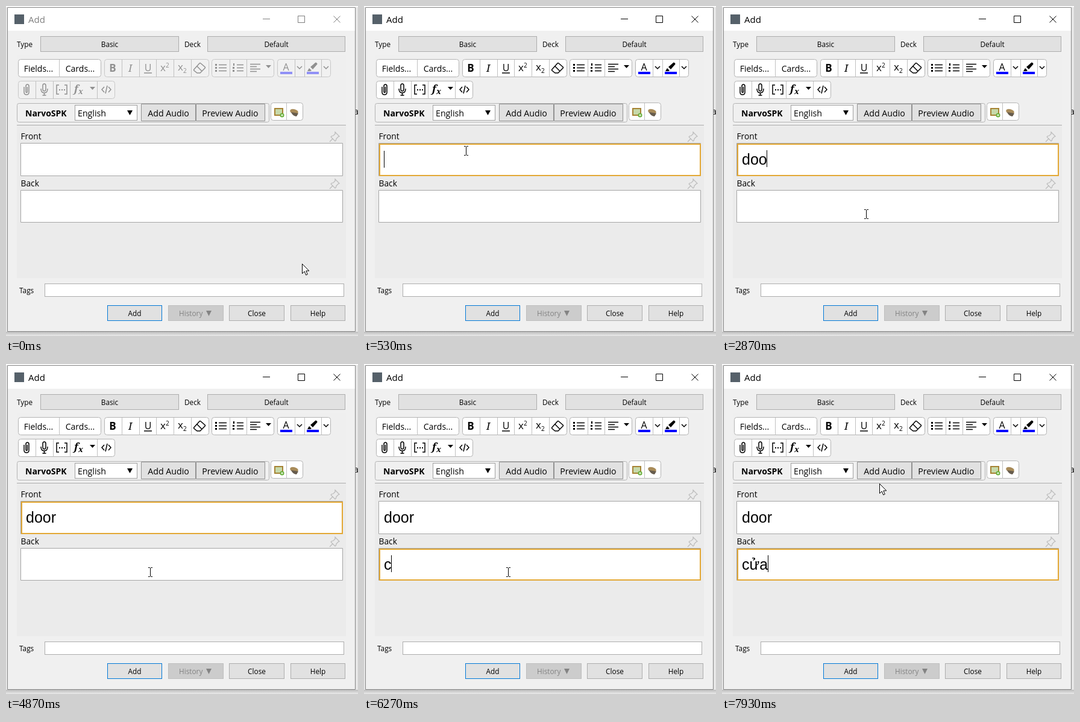
Write an HTML page that moves like this. It is 584 by 547 pixels and loops after 8 s.

```html
<!DOCTYPE html>
<html lang="en">
<head>
<meta charset="utf-8">
<title>Add card</title>
<style>
html, body { margin: 0; width: 100%; height: 100%; overflow: hidden; background: #e6e6e6; }
svg { display: block; width: 584px; height: 547px; }
text { font: 14.2px "Open Sans", "Noto Sans", sans-serif; fill: #000; white-space: pre; }
.mid { text-anchor: middle; }
.small { font-size: 11.8px; }
.label { font-size: 13.8px; }
.bold { font-weight: 700; }
.typed { font: 25px "Liberation Sans", Arial, sans-serif; }
.button { fill: #e1e1e1; stroke: #adadad; }
.box { fill: #fff; stroke: #b4b4b4; }
.sep { fill: none; stroke: #c0c0c0; }
.line { fill: none; stroke: #000; stroke-width: 1.5; }
.pin { fill: none; stroke: #bbb; stroke-width: 1.2; }
.focus { fill: none; stroke: #e3a835; stroke-width: 2; }
.idle .tool { opacity: .4; }
.idle .tool-box { fill: #f1f1f1; stroke: #c8c8c8; }
.idle .title { opacity: .5; }
</style>
</head>
<body>
<svg id="stage" viewBox="0 0 584 547">
  <defs>
    <linearGradient id="shadow" x2="0" y2="1"><stop stop-color="#bdbdbd"/><stop offset="1" stop-color="#e9e9e9"/></linearGradient>
    <path id="down" d="M0 0h9l-4.5 5z"/>
    <path id="chevron" class="line" d="M0 0l4 4 4-4"/>
    <g id="pin" class="pin"><path d="M9 1l7 7-2 1-3 3q0 3-2 4l-7-7q1-2 4-2l3-3zM5 12l-5 5"/></g>
  </defs>

  <!-- window -->
  <path fill="#fafafa" d="M0 0h584v2H0z"/>
  <path fill="url(#shadow)" d="M0 540h584v7H0z"/>
  <text x="577" y="180">a</text>
  <path fill="#f0f0f0" stroke="#858585" d="M2.5 2.5h577v537H2.5z"/>
  <path fill="#fff" d="M3 3h576v38H3z"/>
  <rect x="14" y="14" width="16" height="16" fill="#56616a"/>
  <g class="title">
    <text x="37" y="28" style="font-size:15px">Add</text>
    <path fill="none" stroke="#000" d="M426 21.5h12M484.500 16.500h11v11h-11zM543.500 16.500l11 11m0-11l-11 11"/>
  </g>

  <text class="small" x="18" y="68">Type</text>
  <rect class="button" x="57.500" y="50.500" width="229" height="25"/>
  <text class="small mid" x="172" y="68">Basic</text>
  <text class="small" x="296" y="68">Deck</text>
  <rect class="button" x="334.500" y="50.500" width="228" height="25"/>
  <text class="small mid" x="448.500" y="68">Default</text>

  <!-- editor toolbar -->
  <path fill="#ebebeb" d="M18 198h546v253H18z"/>
  <path fill="#efefef" d="M18 82h546v115H18z"/>
  <path stroke="#adadad" d="M18 197.500h546"/>
  <rect class="box" x="20.500" y="88.500" width="137" height="29" rx="4"/>
  <path class="sep" d="M88.500 89v29"/>
  <text class="mid" x="54" y="109" style="font-size:14px">Fields...</text>
  <text class="mid" x="123" y="109" style="font-size:14px">Cards...</text>
  <rect class="box tool-box" x="163.500" y="88.500" width="173" height="29" rx="4"/>
  <rect class="box tool-box" x="341.500" y="88.500" width="103" height="29" rx="4"/>
  <rect class="box tool-box" x="450.500" y="88.500" width="88" height="29" rx="4"/>
  <rect class="box tool-box" x="20.500" y="124.500" width="160" height="29" rx="4"/>
  <path class="sep" d="M192.500 89v29m29-29v29m28-29v29m29-29v29m29-29v29M371.500 89v29m28-29v29M479.500 89v29m16-29v29m28-29v29M49.500 125v29m29-29v29m28-29v29m45-29v29"/>
  <g class="tool">
    <text class="mid bold" x="177" y="109" style="font-size:17px">B</text>
    <text class="mid" x="206" y="109" style="font:italic 17px 'Noto Serif',serif">I</text>
    <text class="mid" x="235.500" y="108" style="font-size:16px">U</text>
    <path class="line" d="M229 111h13"/>
    <text x="256" y="108" style="font-size:17px">x<tspan dy="-6" style="font-size:10px">2</tspan></text>
    <text x="285" y="107" style="font-size:17px">x<tspan dy="4" style="font-size:10px">2</tspan></text>
    <path class="line" d="M312 105l9-10q1-1 2 0l7 6q1 1 0 2l-8 8h-5l-5-4q-1-1 0-2zM317 100l8 8"/>
    <path class="line" d="M353 97.500h13m-13 5h13m-13 5h13M383 97.500h11m-11 5h11m-11 5h11M405 96.500h17m-17 4h11m-11 4h17m-17 4h11"/>
    <path d="M347 96h3v3h-3zm0 5h3v3h-3zm0 5h3v3h-3zM377 95h2v4h-2zm-1 6h3v3h-3zm0 5h3v3h-3z"/>
    <use href="#down" x="431" y="98"/>
    <text class="mid" x="464.500" y="107" style="font-size:16px">A</text>
    <path fill="#00f" d="M455 109h20v4h-20zM499 109h20v4h-20z"/>
    <use href="#chevron" x="483" y="100"/>
    <use href="#chevron" x="527" y="100"/>
    <path d="M505 101l8-7q1-1 2 0l1 1q1 1 0 2l-7 8zM503 103l4 4-2 1h-5z"/>
    <path class="line" d="M30 134v9q0 4 4 4t4-4v-10q0-3-2.500-3t-2.500 3v9q0 1.500 1.200 1.500t1.200-1.500v-8"/>
    <path class="line" d="M61 132q0-3 2.500-3t2.500 3v6q0 3-2.500 3t-2.500-3zM58 137q0 7 5.500 7t5.500-7M63.500 144v4m-3 0h6M88 131h-4v15h4M97 131h4v15h-4"/>
    <path d="M88 138h2v2h-2zm4 0h2v2h-2zm4 0h2v2h-2z"/>
    <text x="113" y="143" style="font:italic 600 17px 'Noto Serif',serif">f<tspan dy="3" style="font-size:13px">x</tspan></text>
    <use href="#down" x="139" y="134"/>
    <path class="line" d="M163 134l-4 4.500 4 4.500M170 134l4 4.500-4 4.500M168 132l-3 13"/>
  </g>

  <!-- speech bar -->
  <rect x="18.500" y="161.500" width="418" height="31" rx="3" fill="#f0f0f0" stroke="#b4b4b4"/>
  <text class="bold" x="32" y="183" style="font-size:14px">NarvoSPK</text>
  <rect x="114.500" y="164.500" width="103" height="25" fill="#fff" stroke="#a0a0a0"/>
  <text x="119" y="183">English</text>
  <path d="M201 173h9l-4.500 8z"/>
  <path class="button" style="stroke:#929292" d="M224.500 162.500h90v28h-90zM315.500 162.500h114v28h-114z"/>
  <text class="mid" x="269.500" y="183">Add Audio</text>
  <text class="mid" x="372" y="183">Preview Audio</text>
  <rect class="box" x="439.500" y="160.500" width="53" height="29" rx="4"/>
  <path class="sep" d="M465.500 161v29"/>
  <path fill="#c7d9aa" stroke="#a68334" stroke-width="2" d="M446 170h13v11h-13z"/>
  <circle cx="458" cy="181" r="3.500" fill="#64ae36"/>
  <path stroke="#fff" d="M456 181h4m-2-2v4"/>
  <ellipse cx="478" cy="175" rx="7" ry="4" fill="#a88b59" transform="rotate(15 478 175)"/>
  <path fill="#665c4d" d="M473 176l12 2-3 5q-6 0-9-7z"/>

  <!-- fields -->
  <text class="label" x="24.500" y="221">Front</text>
  <text class="label" x="24.500" y="299">Back</text>
  <use href="#pin" x="537" y="208"/>
  <use href="#pin" x="537" y="286"/>
  <path fill="#fff" stroke="#a5a5a5" d="M24.500 227.500h534v54h-534zM24.500 305.500h534v53h-534z"/>
  <rect class="focus" id="focus" x="26" width="532"/>
  <text class="typed" id="front" x="33" y="263"></text>
  <text class="typed" id="back" x="33" y="341"></text>
  <rect id="caret" width="1" height="28"/>

  <text class="small" x="22" y="476">Tags</text>
  <rect x="64.500" y="460.500" width="496" height="21" fill="#fff" stroke="#adadad"/>
  <rect class="button" style="stroke:#0078d7" x="168.500" y="496.500" width="90" height="25"/>
  <rect class="button" style="fill:#ccc;stroke:#bfbfbf" x="269.500" y="496.500" width="91" height="25"/>
  <rect class="button" x="370.500" y="496.500" width="91" height="25"/>
  <rect class="button" x="472.500" y="496.500" width="90" height="25"/>
  <text class="small mid" x="213.500" y="514">Add</text>
  <text class="small" x="287" y="514" style="fill:#838383">History</text>
  <path fill="#838383" d="M332 505h9l-4.500 9z"/>
  <text class="small mid" x="416" y="514">Close</text>
  <text class="small mid" x="517.500" y="514">Help</text>

  <path id="arrow" fill="#fff" stroke="#000" d="M.5.5v16l3.700-3.500 2.500 6 2.600-1.200-2.500-5.800h5z"/>
  <path id="beam" fill="none" stroke="#000" d="M-3 -7.500h2.500l1 1 1-1H4M.5-7v14M-3 7.500h2.500l1-1 1 1H4"/>
</svg>
<script>
const $ = id => document.getElementById(id);
const LOOP = 8000, TICKS_PER_MS = 0.015;
const CLICK = 8, TAB = 78;

// Times are in ticks of 1/15 s.
const frontKeys = [[CLICK, ""], [37, "d"], [39, "do"], [43, "doo"], [49, "door"]];
const backKeys = [[TAB, ""], [94, "c"], [96, "cu"], [97, "cư"], [98, "cưa"], [99, "cửa"]];
const pointer = [
  [0, 491, 427], [7, 169, 240], [11, 169, 240], [16, 239, 345], [110, 239, 345],
  [112, 260, 213], [114, 260, 213], [115, 261, 217], [117, 261, 217], [119, 261, 198]
];

const latest = (keys, tick) => keys.filter(k => k[0] <= tick).pop() || [0, ""];

function pointerAt(tick) {
  const i = Math.max(1, pointer.findIndex(p => p[0] >= tick));
  const [t0, x0, y0] = pointer[i - 1], [t1, x1, y1] = pointer[i];
  const u = (tick - t0) / (t1 - t0), e = u * u * (3 - 2 * u);
  return [Math.round(x0 + (x1 - x0) * e), Math.round(y0 + (y1 - y0) * e)];
}

function show(id, visible) {
  $(id).style.display = visible ? "" : "none";
}

function draw(tick) {
  const active = tick >= CLICK, onBack = tick >= TAB;
  $("stage").classList.toggle("idle", !active);
  $("front").textContent = latest(frontKeys, tick)[1];
  $("back").textContent = latest(backKeys, tick)[1];

  show("focus", active);
  $("focus").setAttribute("y", onBack ? 307 : 229);
  $("focus").setAttribute("height", onBack ? 51 : 52);

  const [edited, text] = latest(onBack ? backKeys : frontKeys, tick);
  show("caret", active && (tick - edited) % 16 < 8);
  const width = text ? $(onBack ? "back" : "front").getComputedTextLength() : 0;
  $("caret").setAttribute("x", Math.floor(33 + width));
  $("caret").setAttribute("y", (onBack ? 318 : 240) - (text ? 1 : 0));

  const [x, y] = pointerAt(tick);
  const inField = x > 24 && x < 559 && (y > 227 && y < 282 || y > 305 && y < 359);
  show("beam", inField);
  show("arrow", !inField);
  $(inField ? "beam" : "arrow").setAttribute("transform", `translate(${x} ${y})`);
}

function loop() {
  draw(Math.floor((performance.now() % LOOP) * TICKS_PER_MS + 0.06) % 120);
  requestAnimationFrame(loop);
}
loop();
</script>
</body>
</html>
```
